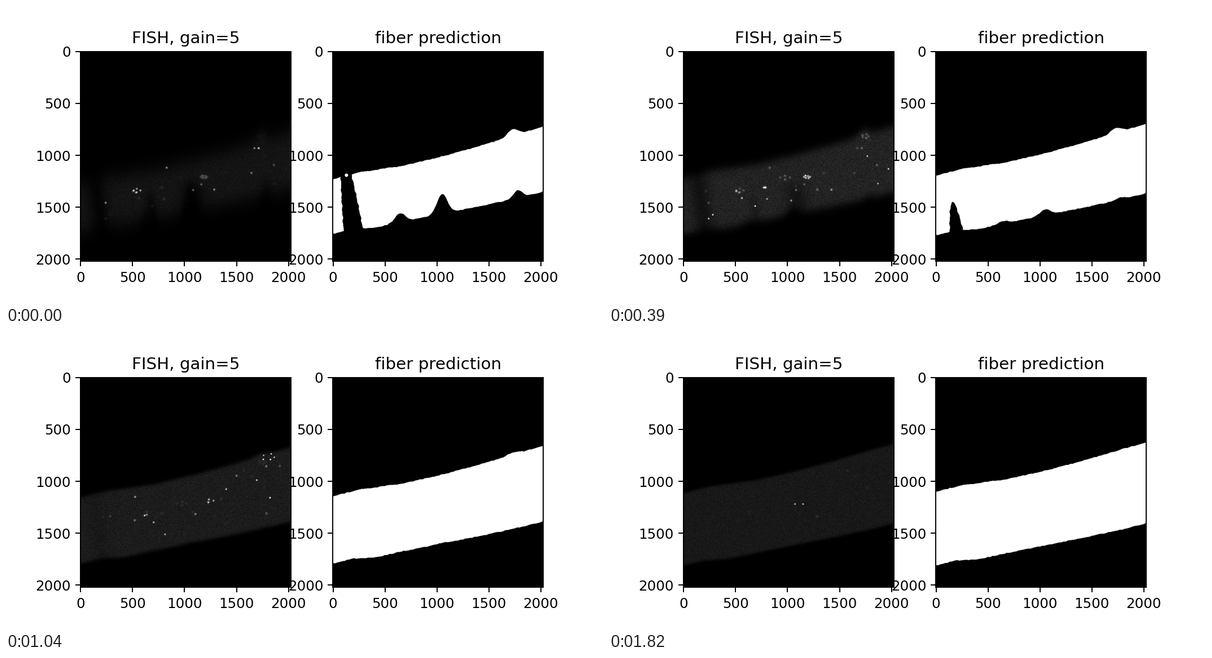
These frames come from a looping animation (1058 px wide and 529 px high, 1950 ms). A matplotlib script:

```python
import numpy as np
import matplotlib.pyplot as plt
from matplotlib.animation import FuncAnimation

FRAMES, INTERVAL = 15, 130
LAST = FRAMES - 1
SIDE = 2024                             # image side in data units
LEFT, TOP, SIZE = 132.25, 80.78, 372.7  # left panel, in stage pixels


def grid(n):
    """Relative x (row) and stage y (column) of n x n cell centres."""
    u = (np.arange(n) + 0.5) / n
    return u, (TOP + u * SIZE)[:, None]


def bump(u, center, width):
    return np.exp(-((u - center) / width) ** 2)


def sigmoid(v):
    return 1 / (1 + np.exp(-np.clip(v, -40, 40)))


def edges(t, u):
    """Upper and lower outline of the fiber at depth t, in stage y."""
    rest = (1 - t / LAST) ** 1.3
    top = np.interp(u, (0, .135, .34, .54, .73, .89, 1), (284, 272, 262, 245, 226, 208, 197))
    top = top + rest * (24 - 6 * u) - max(0, 12 - t) * bump(u, .855, .032)
    bottom = np.interp(u, (0, .1, .2, .43, .75, .91, 1), (415, 406, 404, 386, 362, 349, 340))
    notches = 16 * bump(u, .32, .035) + 35 * bump(u, .52, .035) + 14 * bump(u, .88, .03)
    return top, bottom - 10 * rest - notches * 0.45 ** (t / 2)


def in_gap(t, x, y):
    """Dark wedge near the left end that sinks out of the fiber with depth."""
    v = (y - 300) / 92
    start = -0.45 + 0.325 * t
    half = (17 - 2 * t) * np.sqrt(np.clip((v - start) / 1.45, 0, None)
                                  * 1.45 / max(1 - start, 0.15))
    sway = np.sin(y / 3.1) + 0.6 * np.sin(y / 1.7 + t)
    return (t < 5) & (np.abs(x - 156 - 12 * v - 0.5 * sway) < half)


def make_spots():
    """Spots as (x, y, depth of focus, gain): a few clusters and a loose scatter."""
    rng = np.random.default_rng(4)
    clusters = [(232, 328, 1, 4, 6), (351, 304, 2, 6, 5), (444, 253, 1, 2, 4),
                (454, 232, 5, 5, 7), (276, 323, 4, 2, 2), (362, 300, 7, 3, 7),
                (466, 223, 8, 5, 12), (336, 306, 14, 2, 8), (312, 305, 5, 4, 8)]
    spots = []
    for x, y, focus, count, spread in clusters:
        for turn in np.linspace(0, 2 * np.pi, count, endpoint=False):
            reach = spread * rng.uniform(0.6, 1.1)
            spots.append((x + reach * np.cos(turn), y + 0.5 * reach * np.sin(turn),
                          focus, rng.uniform(0.9, 1.5)))
    for _ in range(44):
        u, v = rng.uniform(0.04, 0.98), rng.uniform(0.08, 0.85)
        top, bottom = edges(6, u)
        spots.append((LEFT + u * SIZE, top + v * (bottom - top),
                      1 + 11 * rng.random() ** 1.3, rng.uniform(0.7, 1.3)))
    return spots


SPOTS = make_spots()


def fish_image(t):
    n = 373
    u, y = grid(n)
    x = LEFT + u * SIZE
    rng = np.random.default_rng(100 + t)

    top, bottom = edges(t, u)
    soft = 1.3 + 8 * np.exp(-t / 3)
    body = (sigmoid((y - top - 1 - 0.8 * soft) / soft)
            * sigmoid((bottom - 0.6 * (soft - 1.3) - y) / soft))
    # dark bands: centre, width, depth, upper end, lifetime
    for center, width, depth, start, life in ((162, 18, .75, 250, 10),
                                              (332, 19, .75, 316, 7),
                                              (256, 8, .6, 335, 5)):
        middle = center + 0.15 * (y - 340)
        body = body * (1 - depth * max(0, 1 - t / life) * bump(x, middle, width)
                       * sigmoid((y - start) / 6))

    level = (22 + 24 * np.exp(-t / 6)) * (1 - 0.55 * np.exp(-t))
    image = level * body * (1 + 0.2 * rng.normal(size=(n, n)))
    for sx, sy, focus, gain in SPOTS:
        d = abs(t - focus)
        sigma = 0.8 + 0.3 * d
        peak = gain * (230 * np.exp(-(d / 1.5) ** 2) + 16 * np.exp(-(d / 3.5) ** 2))
        image += peak * bump(y, sy, 1.4 * sigma) * bump(x, sx, 1.4 * sigma)
    return np.clip(image, 0, 255)


def mask_image(t):
    u, y = grid(2 * 373)
    x = LEFT + u * SIZE
    rng = np.random.default_rng(7)
    knots = np.linspace(0, 1, 90)
    top, bottom = (edge + np.interp(u, knots, rng.uniform(-0.7, 0.7, len(knots)))
                   for edge in edges(t, u))
    mask = (y > top) & (y < bottom) & ~in_gap(t, x, y)
    droplet = np.hypot(x - 156.5, y - 301) < 3
    return 255.0 * (mask | droplet)


fig, axes = plt.subplots(1, 2, figsize=(6, 3), dpi=1058 / 6)
panels = []
for ax, title, make in zip(axes, ("FISH, gain=5", "fiber prediction"),
                           (fish_image, mask_image)):
    ax.set_title(title)
    picture = ax.imshow(make(0), cmap="gray", vmin=0, vmax=255,
                        extent=(-0.5, SIDE - 0.5, SIDE - 0.5, -0.5))
    ax.set_xticks(range(0, SIDE, 500))
    ax.set_yticks(range(0, SIDE, 500))
    panels.append((picture, make))


def update(frame):
    for picture, make in panels:
        picture.set_data(make(frame))
    return [picture for picture, _ in panels]


anim = FuncAnimation(fig, update, frames=FRAMES, interval=INTERVAL, repeat=True)
plt.show()
```
